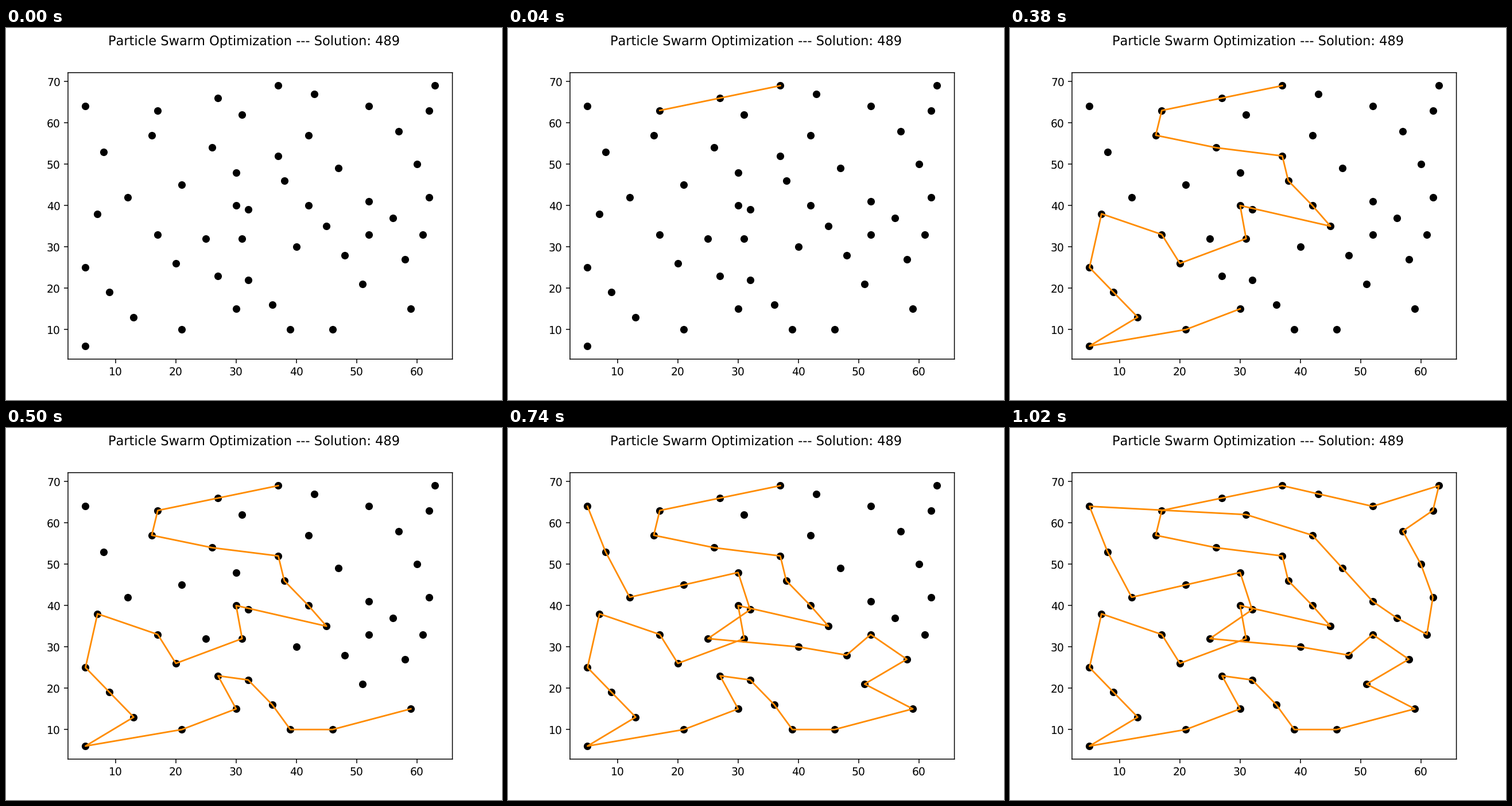
These frames come from a looping animation (864x648 px, 1.24 s). A matplotlib script:

```python
import matplotlib.pyplot as plt
import numpy as np
from matplotlib.animation import FuncAnimation

STEP = 20     # ms per frame
HOLD = 11     # frames the closed tour stays
FLASH = 1     # the frame that turns grey

# None is a city halfway between its neighbours, on the integer grid
KEYS = [
    (37, 69), None, (17, 63), (16, 57), None, (37, 52), (38, 46), None,
    (45, 35), (30, 40), (31, 32), (20, 26), (17, 33), (7, 38), (5, 25), None,
    (13, 13), (5, 6), (21, 10), (30, 15), (27, 23), (32, 22), None, (39, 10),
    (46, 10), (59, 15), (51, 21), (58, 27), (52, 33), (48, 28), (40, 30),
    (25, 32), (32, 39), (30, 48), None, (12, 42), None, (5, 64), (31, 62),
    (42, 57), None, (52, 41), None, (61, 33), (62, 42), None, (57, 58),
    (62, 63), (63, 69), (52, 64), (43, 67),
]


def city(i):
    return KEYS[i] or np.rint(np.mean([KEYS[i - 1], KEYS[i + 1]], axis=0))


count = len(KEYS)
tour = np.array([city(i % count) for i in range(count + 1)])

# Sub-pixel placement and unkerned text
plt.rcParams.update({
    "path.snap": False,
    "text.hinting": "none",
    "text.kerning_factor": 6,
})

fig, ax = plt.subplots(figsize=(6.4, 4.8), dpi=135)
fig.suptitle("Particle Swarm Optimization --- Solution: 489")
ax.scatter(*tour[:-1].T, s=36, color="black", linewidths=1)
path, = ax.plot([], [])


def draw(i):
    paper, ink = ("#aaaaaa", "#2d2d2d") if i == FLASH else ("white", "darkorange")
    fig.set_facecolor(paper)
    ax.set_facecolor(paper)
    path.set_color(ink)
    # i edges need i + 1 points
    path.set_data(*tour[:i + 1 if i else 0].T)
    return path,


anim = FuncAnimation(fig, draw, frames=count + HOLD, interval=STEP,
                     repeat=True, repeat_delay=0, blit=False)
plt.show()
```
